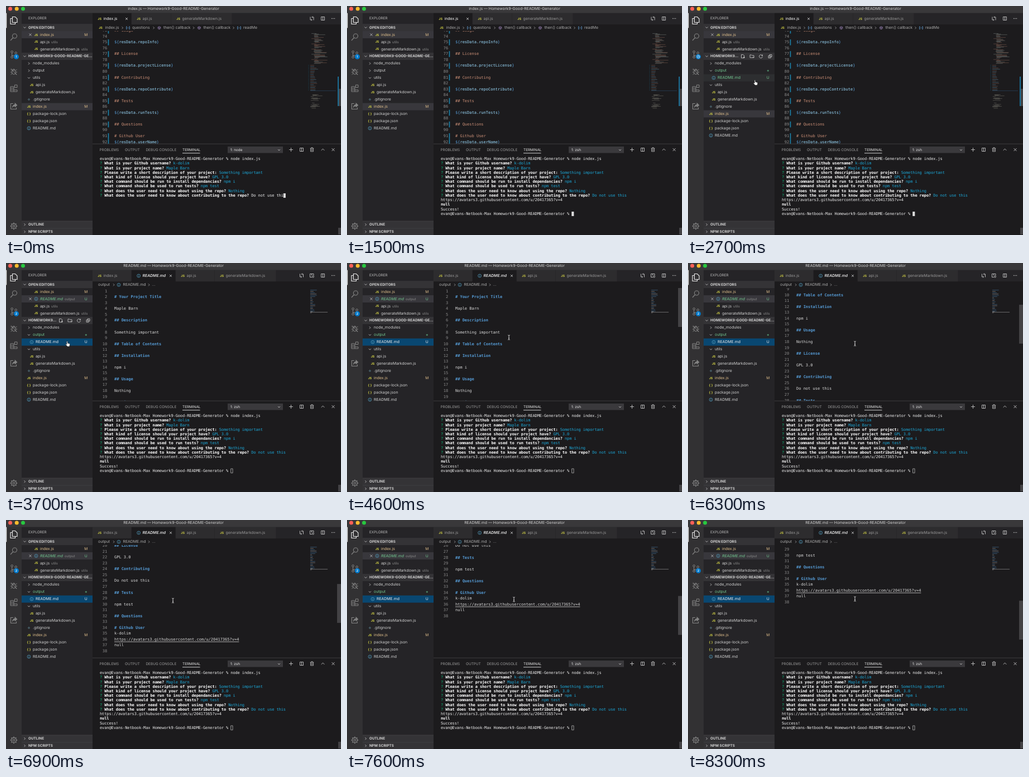
Recreate the animation shown at these times as an HTML page with a canvas. Size 600 by 412 pixels, loop 8500 ms.

```html
<!DOCTYPE html>
<html lang="en">
<head>
<meta charset="utf-8">
<title>README generator</title>
<style>
  html, body { margin: 0; width: 100%; height: 100%; overflow: hidden; background: #1c1b1d; }
  canvas { display: block; }
</style>
</head>
<body>
<canvas id="stage" width="600" height="412"></canvas>
<script>
const g = document.getElementById('stage').getContext('2d');
const LOOP = 8500, EXPAND = 2100, OPEN = 3500;
const EDIT = '#1c1b1d', SIDE = '#252427', BAR = '#323133', THUMB = '#434245';
const GREY = '#adadad', TEXT = '#d2d2d2', WHITE = '#eeeeee', YELLOW = '#d6d545', AMBER = '#e2c08d', GREEN = '#73c991';
const BLUE = '#569cd6', CYAN = '#1ca8d8', CODE = '#dadada';
const UI = '6.9px Inter, sans-serif', CAPS = '6.4px Inter, sans-serif', HEAD = 'bold ' + CAPS;
const MONO = '7px "DejaVu Sans Mono", monospace', BOLD = 'bold ' + MONO;
const LINE = 10.55, TERM = 8.22, CELL = 4.11, ROW = 12.95, TOP = 51.6;
const USER = 'k-dolim', PROJECT = 'Maple Barn';
const AVATAR = 'https://avatars3.githubusercontent.com/u/20417365?v=4';
const PROMPT = 'evan@Evans-Netbook-Max Homework9-Good-README-Generator % ';

// Text of the two documents, keyed by line number
const template = {
  73: '## Usage', 75: '${resData.repoInfo}', 77: '## License', 79: '${resData.projectLicense}',
  81: '## Contributing', 83: '${resData.repoContribute}', 85: '## Tests', 87: '${resData.runTests}',
  89: '## Questions', 91: '# Github User', 92: '${resData.userName}'
};
const readme = {
  2: '# Your Project Title', 4: PROJECT, 6: '## Description', 8: 'Something important',
  10: '## Table of Contents', 12: '## Installation', 14: 'npm i', 16: '## Usage', 18: 'Nothing',
  20: '## License', 22: 'GPL 3.0', 24: '## Contributing', 26: 'Do not use this', 28: '## Tests',
  30: 'npm test', 32: '## Questions', 34: '# Github User', 35: USER, 36: AVATAR, 37: 'null'
};
const questions = [
  ['What is your Github username?', USER],
  ['What is your project name?', PROJECT],
  ['Please write a short description of your project:', 'Something important'],
  ['What kind of license should your project have?', 'GPL 3.0'],
  ['What command should be run to install dependancies?', 'npm i'],
  ['What command should be used to run tests?', 'npm test'],
  ['What does the user need to know about using the repo?', 'Nothing'],
  ['What does the user need to know about contributing to the repo?', 'Do not use this']
];

// Keyframes: [time, ...values]
const mouseKeys = [[1600, 300, 190], [2000, 108, 118], [2200, 108, 118], [2700, 119, 133],
  [3200, 112, 140], [3500, 106, 142], [3800, 110, 140], [4300, 260, 132], [4600, 290, 134],
  [5000, 297, 142], [5400, 299, 145], [6900, 299, 145], [7900, 299, 142]];
const scrollKeys = [[5300, 0], [5900, 48], [6000, 48], [6300, 88], [6900, 205], [7400, 256], [7900, 286], [8200, 293]];

function at(keys, t) {
  const i = keys.findIndex(k => k[0] > t);
  if (i === 0) return keys[0].slice(1);
  if (i < 0) return keys[keys.length - 1].slice(1);
  const a = keys[i - 1], b = keys[i], f = (t - a[0]) / (b[0] - a[0]);
  return a.slice(1).map((v, n) => v + (b[n + 1] - v) * f);
}
const random = n => { const v = Math.sin(n * 12.9898) * 43758.5453; return v - Math.floor(v); };

function rect(x, y, w, h, color) { g.fillStyle = color; g.fillRect(x, y, w, h); }
function dot(x, y, r, color) {
  g.fillStyle = color; g.beginPath(); g.arc(x, y, r, 0, 7); g.fill();
}
function text(s, x, y, color = TEXT, font = UI, align = 'left') {
  g.font = font; g.fillStyle = color; g.textAlign = align;
  g.fillText(s, x, y);
  return x + g.measureText(s).width;
}
function draw(d, x, y, color = GREY, width = .8, fill) {
  g.save();
  g.translate(x, y);
  const p = new Path2D(d);
  if (fill) { g.fillStyle = fill; g.fill(p); }
  g.strokeStyle = color; g.lineWidth = width; g.stroke(p);
  g.restore();
}
// Consecutive coloured pieces on a fixed character grid
function runs(x, y, cell, ...pieces) {
  for (const [s, color, font = MONO] of pieces) { text(s, x, y, color, font); x += s.length * cell; }
  return x;
}

const circle = r => `M${r} 0A${r} ${r} 0 1 1 ${-r} 0A${r} ${r} 0 1 1 ${r} 0Z`;
const CROSS = 'M-2-2L2 2M2-2L-2 2', RIGHT = 'M-1-2L1 0L-1 2', DOWN = 'M-2-1L0 1L2-1';
const SPLIT = 'M-3-3H3V3H-3ZM0-3V3', CUBE = 'M0-2.5L2.3-1.2V1.3L0 2.5L-2.3 1.3V-1.2ZM-2.3-1.2L0 0L2.3-1.2M0 0V2.5';
const BRACKETS = 'M-1.7-2.3H-2.8V2.3H-1.7M1.7-2.3H2.8V2.3H1.7M-1 0H1';
const PAGE = 'M-2.5-3H1L2.5-1.5V3H-2.5Z', COMPARE = 'M-3-3V2.5H0M3 3V-2.5H0M-1.2 1.2L.2 2.5L-1.2 3.8M1.2-3.8L-.2-2.5L1.2-1.2';

function fileIcon(kind, x, y) {
  if (kind === 'js') text('JS', x, y + .3, YELLOW, 'bold 5.4px Inter, sans-serif', 'center');
  if (kind === 'json') text('{ }', x, y, YELLOW, 'bold 5.8px Inter, sans-serif', 'center');
  if (kind === 'git') draw('M0-2L2 0L0 2L-2 0Z', x, y, '#53707c', .5, '#41535b');
  if (kind === 'md') { draw(circle(2.9), x, y, '#519aba', .8); draw('M0-.4V1.7M0-1.7V-1', x, y, '#519aba', .9); }
  if (kind === 'open') draw(DOWN, x, y, TEXT);
  if (kind === 'shut') draw(RIGHT, x, y, TEXT);
}

function activityBar(t) {
  const dim = '#858585';
  rect(0, 12.5, 28, 400, BAR);
  rect(0, 12.5, 1.2, 27, WHITE);
  draw('M-2.5-6.5H2.5L6-3V3.5H-2.5ZM-2.5-3.5H-6V6.5H2.5V3.5', 14, 26, WHITE, 1.1);
  draw('M5.5-2A4 4 0 1 1-2.5-2A4 4 0 1 1 5.5-2ZM-1.3 1L-6 6', 14, 56, dim, 1.1);
  draw('M-1.5-4.5a1.8 1.8 0 1 1-3.6 0a1.8 1.8 0 1 1 3.6 0ZM-1.5 5a1.8 1.8 0 1 1-3.6 0a1.8 1.8 0 1 1 3.6 0Z' +
    'M5.5-2.5a1.8 1.8 0 1 1-3.6 0a1.8 1.8 0 1 1 3.6 0ZM-3.3-2.7V3.2M3.7-.7Q3 2-3.3 2.5', 14, 87, dim, 1);
  dot(18.5, 91.3, 4.5, '#007acc');
  if (t >= 2400 && t < 3100) { draw(circle(2.4), 18.5, 91.3, WHITE, .8); draw('M0-1.4V0H1.2', 18.5, 91.3, WHITE, .7); }
  else text(t < 2400 ? '1' : '2', 18.5, 91.5, '#fff', '600 5.4px Inter, sans-serif', 'center');
  draw('M3.3 1a3.3 4 0 1 1-6.6 0a3.3 4 0 1 1 6.6 0ZM-2-2.5A2 2 0 0 1 2-2.5M-3.3 1H-6M3.3 1H6M-3-1.5L-5.5-4M3-1.5L5.5-4' +
    'M-3 3L-5.2 5.5M3 3L5.2 5.5M-5-5.5L5 6', 14, 118, dim, 1);
  draw('M-6-3H0V3H6V6H-6ZM-6 3H0V6M0 0H-6M1.5-6H6V-1.5H1.5Z', 14, 148, dim, 1);
  draw('M-1-4.5H-5.5V5.5H4.5V2.5', 14, 180, dim, 1.1);
  draw('M-2.5 2.5Q-2-2.5 2-2.5V-5.5L6-1.5L2 2V-.3Q-1-.3-2.5 2.5Z', 14, 180, dim, .8, dim);
  draw(circle(4.4) + circle(1.8), 14, 396, dim, 1.1);
  for (let a = 0; a < 8; a++) {
    const c = Math.cos(a * Math.PI / 4), s = Math.sin(a * Math.PI / 4);
    draw(`M${c * 4.4} ${s * 4.4}L${c * 6.2} ${s * 6.2}`, 14, 396, dim, 1.7);
  }
}

function sidebar(t, mouse) {
  const opened = t >= OPEN, expanded = t >= EXPAND;
  const over = mouse && mouse[0] > 28 && mouse[0] < 155;
  const hover = over ? Math.round((mouse[1] - TOP) / ROW) : -9;
  const PICK = '#38373c';
  let index = 0;
  const head = (label, y) => {
    rect(28, y - 6.5, 127, 13, '#343336');
    text(label, 40, y, TEXT, HEAD);
  };
  const row = (kind, name, x, { color = TEXT, mark, note, bg, italic, close } = {}) => {
    const y = TOP + ROW * index;
    if (!bg && index === hover) bg = '#2d2e30';
    if (bg) rect(28, y - 6.5, 127, ROW, bg);
    if (close) draw(CROSS, 43.5, y, TEXT);
    fileIcon(kind, x - 7, y);
    const end = text(name, x, y, color, (italic ? 'italic ' : '') + UI);
    if (note) text(note, end + 3, y + .3, '#8a8a8a', '6.1px Inter, sans-serif');
    if (mark === 'dot') dot(143.3, y, 1.6, '#4b8162');
    else if (mark) text(mark, 143.3, y, bg === '#094771' ? WHITE : color, '6.6px Inter, sans-serif', 'center');
    index++;
  };

  rect(28, 12.5, 127, 400, SIDE);
  text('EXPLORER', 40, 22.4, '#bbbbbb', CAPS);
  head('OPEN EDITORS', TOP - ROW);
  draw(DOWN, 33.5, TOP - ROW, TEXT);
  row('js', 'index.js', 61, { color: AMBER, mark: 'M', close: !opened, bg: !opened && PICK });
  if (opened) row('md', 'README.md', 61, { color: GREEN, mark: 'U', note: 'output', italic: true, close: true, bg: PICK });
  row('js', 'api.js', 61, { note: 'utils' });
  row('js', 'generateMarkdown.js', 61, { note: 'utils' });

  const y = TOP + ROW * index;
  head(over ? 'HOMEWORK9...' : 'HOMEWORK9-GOOD-README-GE...', y);
  draw(DOWN, 33.5, y, TEXT);
  if (over) {
    draw(PAGE + 'M1 2H4M2.5.5V3.5', 98, y, TEXT, .8);
    draw('M-3.5-2.5H-1L0-1.5H3.5V2.5H-3.5ZM1 2H4', 114.5, y, TEXT, .8);
    draw('M2.5-1.5A3 3 0 1 0 3 .5M3-3V-1H1', 130.5, y, TEXT, .8);
    draw('M-3-1H1V3H-3ZM-1-1V-3H3V1H1M-2 1H0', 147, y, TEXT, .8);
  }
  index++;
  row('shut', 'node_modules', 48);
  row(expanded ? 'open' : 'shut', 'output', 48, expanded ? { color: GREEN, mark: 'dot' } : {});
  if (expanded) row('md', 'README.md', 53, { color: opened ? WHITE : GREEN, mark: 'U', bg: opened && '#094771' });
  row('open', 'utils', 48);
  row('js', 'api.js', 53);
  row('js', 'generateMarkdown.js', 53);
  row('git', '.gitignore', 48);
  row('js', 'index.js', 48, { color: AMBER, mark: 'M', bg: !opened && PICK });
  row('json', 'package-lock.json', 48);
  row('json', 'package.json', 48);
  row('md', 'README.md', 48);

  [['OUTLINE', 393.3], ['NPM SCRIPTS', 406.2]].forEach(([label, y]) => {
    head(label, y);
    rect(28, y - 6.6, 127, .7, '#454447');
    draw(RIGHT, 33.5, y, TEXT);
  });
}

function tabBar(opened) {
  rect(155, 12.5, 445, 21, SIDE);
  const tabs = opened
    ? [['js', 'index.js', 155, 225], ['md', 'README.md', 225, 304], ['js', 'api.js', 304, 374], ['js', 'generateMarkdown.js', 374, 484]]
    : [['js', 'index.js', 155, 225], ['js', 'api.js', 225, 296], ['js', 'generateMarkdown.js', 296, 405]];
  tabs.forEach(([kind, name, x, end], i) => {
    const active = i === +opened, left = x + 19.6;
    rect(x, 12.5, end - x - .6, 21, active ? EDIT : '#2d2c2e');
    fileIcon(kind, left - 7, 23);
    text(name, left, 23, active ? '#ffffff' : '#989898', (active && opened ? 'italic 500 ' : '') + UI);
    if (active) draw(CROSS, end - 9, 23, TEXT);
  });
  draw(COMPARE, opened ? 529.5 : 548, 22.5, '#c5c5c5', .9);
  if (opened) draw('M-3.5-3H3V0M-3.5-3V3H0M-.5-3V0M3.5 2a1.5 1.5 0 1 1-3 0a1.5 1.5 0 1 1 3 0Z', 548, 22.5, '#c5c5c5', .9);
  draw(SPLIT, 567.5, 22.5, '#c5c5c5', .9);
  for (const x of [583.5, 586, 588.5]) dot(x, 22.5, .7, '#c5c5c5');
}

function breadcrumbs(opened) {
  rect(155, 33.5, 445, 11.5, EDIT);
  const sep = x => draw(RIGHT, x, 39.3, GREY, .8);
  if (opened) {
    text('output', 165, 39.3, GREY); sep(193);
    fileIcon('md', 202, 39.3);
    text('README.md', 209.5, 39.3, GREY); sep(256);
    text('...', 261.5, 39.3, GREY);
    return;
  }
  fileIcon('js', 169.5, 39.3);
  text('index.js', 177.5, 39.3, GREY);
  [['questions', 226, BRACKETS], ['then() callback', 282, CUBE], ['then() callback', 353.5, CUBE], ['readMe', 425, BRACKETS]]
    .forEach(([name, x, icon]) => {
      sep(x - 17.5);
      draw(icon, x - 7.5, 39.3, icon === CUBE ? '#a78fc6' : '#75beff', .7);
      text(name, x, 39.3, GREY);
    });
}

function minimap(opened) {
  const row = (i, indent, width, color) => rect(545 + indent, 49 + i * 1.17, width, .8, color);
  g.globalAlpha = opened ? .5 : .36;
  if (opened) {
    for (const n in readme) row(n - 2.5, 0, readme[n].length * .586, readme[n][0] === '#' ? BLUE : CODE);
  } else {
    for (let i = 0; i < 48; i++) {
      if (i % 8 === 7) continue;
      row(i, i % 8 ? 6 + random(i) * 2 : 2, 6 + random(i + 60) * 18, random(i + 9) < .5 ? '#ce9178' : '#b9c8c0');
    }
    for (let i = 49; i < 88; i += 2) {
      row(i, 0, 6 + random(i) * 9, i % 4 === 1 ? '#ce9178' : '#9cdcfe');
      row(i, -3.5, 1.2, '#1b9bd0');
    }
    for (let i = 91; i < 117; i++)
      if (random(i + 3) < .5) row(i, random(i) * 5, 4 + random(i + 5) * 14, '#b5b5a0');
    rect(545, 152, 46, .8, '#3a78b0');
  }
  g.globalAlpha = 1;
}

function editor(opened, scroll, mouse) {
  rect(155, 33, 445, 216, EDIT);
  g.save();
  g.beginPath(); g.rect(155, 45, 445, 203); g.clip();
  const lines = opened ? readme : template, first = opened ? 1 : 73, last = opened ? 38 : 92;
  for (let n = first; n <= last; n++) {
    const y = opened ? 61.4 + (n - 2) * LINE - scroll : 65.4 + (n - 75) * LINE, s = lines[n] || '';
    if (y < 38 || y > 254) continue;
    text(n, 181.3, y, '#8c8c8c', MONO, 'right');
    if (!opened) {
      if (s) rect(182.6, y - 5.3, 1.7, LINE, '#1b81a8');
      if (s[0] === '$') runs(194, y, 4.214, ['${', BLUE], [s.slice(2, -1), '#9cdcfe'], ['}', BLUE]);
      else text(s, 194, y, '#ce9178', MONO);
    } else {
      const title = s[0] === '#';
      const end = text(s, 194, y, title ? BLUE : CODE, title ? BOLD : MONO);
      if (s === AVATAR) rect(194, y + 3.6, end - 194, .8, CODE);
    }
  }
  minimap(opened);
  if (!opened) {
    rect(594, 149, 6, 31, THUMB);
    rect(594, 127, 2, 53, '#1b6f96');
  } else if (mouse[0] > 155) rect(593, 45 + scroll * .342, 7, 70, THUMB);
  g.restore();
}

function panel(t) {
  rect(155, 248, 445, 164, EDIT);
  rect(155, 247.7, 445, .8, '#454447');
  text('PROBLEMS', 167.5, 259, '#9c9c9c', CAPS);
  text('OUTPUT', 213, 259, '#9c9c9c', CAPS);
  text('DEBUG CONSOLE', 250.5, 259, '#9c9c9c', CAPS);
  text('TERMINAL', 316, 259, '#e7e7e7', CAPS);
  rect(316, 264.3, 31.5, .9, '#e7e7e7');
  rect(397, 252.8, 99, 11.7, '#3a393c');
  text(t < 800 ? '1: node' : '1: zsh', 402, 259, WHITE, CAPS);
  draw(DOWN, 489, 259, TEXT);
  draw('M-3.5 0H3.5M0-3.5V3.5', 510.5, 258.5, '#c5c5c5', .9);
  draw(SPLIT, 529.5, 258.5, '#c5c5c5', .9);
  draw('M-3.3-2.5H3.3M-2.5-2.5V3.3H2.5V-2.5M-1-2.5V-3.7H1V-2.5M-.8-1V2M.8-1V2', 548, 258.5, '#c5c5c5', .8);
  draw('M-2.8 1.3L0-1.5L2.8 1.3', 567.5, 258.5, '#c5c5c5', .9);
  draw('M-2.5-2.5L2.5 2.5M2.5-2.5L-2.5 2.5', 586, 258.5, '#c5c5c5', .9);
  rect(595, 399, 5, 12, THUMB);

  const X = 168, y = n => 275.3 + n * TERM;
  g.letterSpacing = '-0.104px';
  runs(X, y(0), CELL, [PROMPT + 'node index.js', WHITE]);
  let caret, line = 8;
  questions.forEach(([ask, reply], i) => {
    const typing = i === 7 && t < 400;
    if (typing && t < 100) reply = reply.slice(0, -1);
    caret = runs(X, y(i + 1), CELL, ['? ', '#0dbc79'], [ask + ' ', '#ffffff', BOLD], [reply, typing ? WHITE : CYAN]);
  });
  if (t >= 400) { caret = X; line = 9; }
  if (t >= 700) {
    text(AVATAR, X, y(9), WHITE, MONO);
    text('null', X, y(10), '#ffffff', BOLD);
    line = 11;
  }
  if (t >= 800) {
    text('Success!', X, y(11), WHITE, MONO);
    caret = runs(X, y(12), CELL, [PROMPT, WHITE]);
    line = 12;
  }
  g.letterSpacing = '0px';
  if (t < OPEN) rect(caret, y(line) - 4, 4.1, 8, '#dddddd');
  else draw('M.4-3.8H3.8V3.8H.4Z', caret, y(line), '#cccccc', .7);
}

function pointer([x, y]) {
  if (x < 155) {
    draw('M0 .6Q.8-.6 1.5 .6L1.8 3.6L5 4.4Q6 4.8 5.8 6L5 9.6H1.3L-1.8 6Q-1.8 4.6-.6 5.2L.2 6Z', x, y, '#111', .6, '#fff');
  } else {
    draw('M-1.8-4.2Q0-4.2 0-3Q0-4.2 1.8-4.2M0-3V3M-1.8 4.2Q0 4.2 0 3Q0 4.2 1.8 4.2M-1 1.2H1', x, y, '#dddddd', .9);
  }
}

function frame() {
  const t = Math.floor(performance.now() % LOOP / 100) * 100;
  const opened = t >= OPEN, mouse = t >= 1600 ? at(mouseKeys, t) : null;
  g.textBaseline = 'middle';
  g.textRendering = 'geometricPrecision';
  editor(opened, at(scrollKeys, t)[0], mouse);
  tabBar(opened);
  breadcrumbs(opened);
  panel(t);
  activityBar(t);
  sidebar(t, mouse);
  rect(0, 0, 600, 12.5, '#39383a');
  dot(7.6, 5, 3.5, '#ff5f57');
  dot(19.2, 5, 3.5, '#febc2e');
  dot(30.5, 5, 3.5, '#28c840');
  text((opened ? 'README.md' : 'index.js') + ' — Homework9-Good-README-Generator', 300, 5.3, TEXT, UI, 'center');
  if (mouse) pointer(mouse);
  requestAnimationFrame(frame);
}
frame();
</script>
</body>
</html>
```
